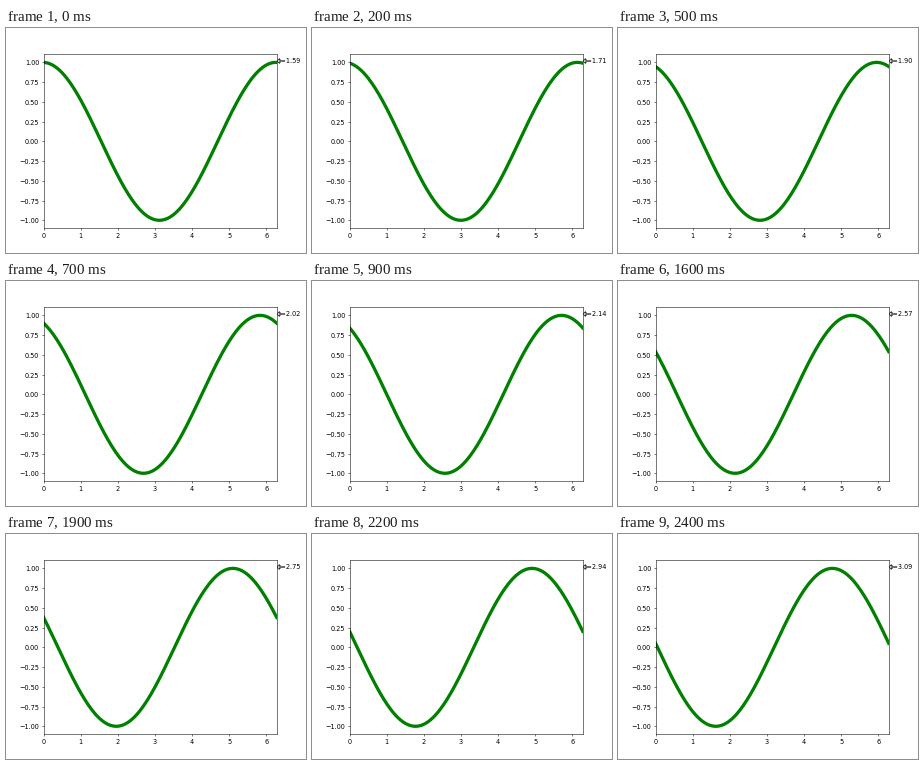
Write a matplotlib script that moves like this. It is 300x225 px and loops after 2.5 s.

```python
import numpy as np
import matplotlib.pyplot as plt
from matplotlib.animation import FuncAnimation

FRAMES = 25
STEP = 0.0306
FIRST = 52

x = np.linspace(0, 2 * np.pi, 200)

# the canvas truncates 300.8 x 225.6 to 300 x 225 pixels
fig, ax = plt.subplots(figsize=(6.4, 4.8), dpi=47)
ax.set_xlim(0, 2 * np.pi)
ax.set_ylim(-1.1, 1.1)
line, = ax.plot([], [], color="green", lw=5)
label = ax.text(2 * np.pi, 1, "")


def phase(i):
    # two steps per frame, with one extra step at the end
    return STEP * (FIRST + i * 49 // (FRAMES - 1))


def update(i):
    phi = phase(i)
    line.set_data(x, np.sin(x + phi))
    label.set_text(f"\u03d5={phi:.2f}")
    return line, label


anim = FuncAnimation(fig, update, frames=FRAMES, interval=100,
                     repeat=True, repeat_delay=0)
plt.show()
```
